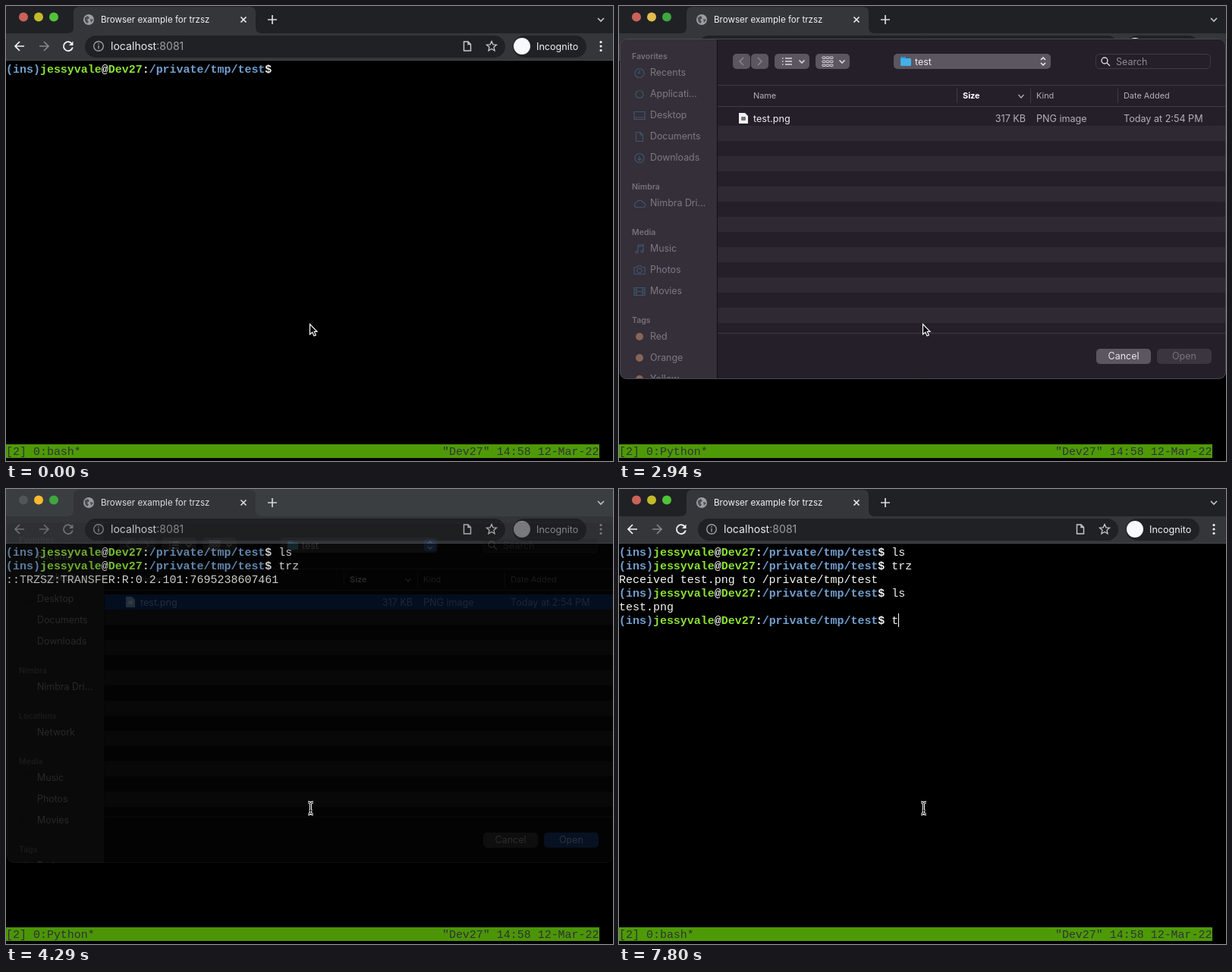
An HTML page with a canvas that plays this animation: 800 px wide and 600 px high, repeating every 8 s.

```html
<!DOCTYPE html>
<html lang="en">
<head>
<meta charset="utf-8">
<title>Browser terminal upload</title>
<style>
  html, body { margin: 0; width: 100%; height: 100%; overflow: hidden; background: #000; }
  canvas { display: block; }
</style>
</head>
<body>
<canvas id="stage" width="800" height="600"></canvas>
<script>
const ctx = document.getElementById('stage').getContext('2d');
const LOOP = 8000, CELL = 8.983, ROW = 18, TOP = 74, COLS = 87;
const BLUE = '#729fcf', GREEN = '#8ae234', WHITE = '#f4f4f2';
const PROMPT = [['(ins)', BLUE], ['jessyvale', GREEN], ['@', WHITE], ['Dev27', GREEN],
  [':', WHITE], ['/private/tmp/test', BLUE], ['$', WHITE]];
const PROMPT_COLS = 40;

// Sheet steps: time, top edge, opacity, page dimming
const SHEET = [[2940, 43, 1, 0], [3060, 59, 1, .2], [3180, 69, 1, .32], [3300, 73, 1, .4],
  [4110, 73, 1, .4], [4290, 44, .14, .03], [4440, 43, 0, 0]];

const OPENING = { bg: '#241f29', stripe: '#2e2933', side: '#342f39', item: '#7e7983', head: '#77727c',
  icon: '#3c566d', line: '#403b45', button: '#5b5660', faint: '#3a353f', popup: '#5b5660' };
const SETTLED = { bg: '#1b1b1b', stripe: '#232525', side: '#323232', item: '#e0e0e0', head: '#7f7f7f',
  icon: '#2f8be6', line: '#3a3a3a', button: '#525252', faint: '#373737', popup: '#4c4c4c' };

const ICONS = {
  clock: 'M-6 0a6 6 0 1 0 12 0a6 6 0 1 0-12 0M0-4V0H-3',
  disc: 'M-5 0a5 5 0 1 0 10 0a5 5 0 1 0-10 0',
  desktop: 'M-7-5H7V5H-7ZM-7 2.5H7',
  page: 'M-4.5-6H1L4.5-2.5V6H-4.5ZM1-6V-2.5H4.5',
  down: 'M-6 0a6 6 0 1 0 12 0a6 6 0 1 0-12 0M0-3V3M-2.5 .5L0 3L2.5 .5',
  cloud: 'M-4 5H4.5A3 3 0 0 0 5-1A5 5 0 0 0-4-1.5A3.3 3.3 0 0 0-4 5Z',
  globe: 'M-6 0a6 6 0 1 0 12 0a6 6 0 1 0-12 0M-6 0H6M0-6V6M0-6Q-6 0 0 6M0-6Q6 0 0 6',
  note: 'M-2 4V-5L5-6V3M-2-3L5-4M-5 4a1.5 1.5 0 1 0 3 0a1.5 1.5 0 1 0-3 0M2 3a1.5 1.5 0 1 0 3 0a1.5 1.5 0 1 0-3 0',
  camera: 'M-7-4H-3L-2-6H2L3-4H7V5H-7ZM-3 .5a3 3 0 1 0 6 0a3 3 0 1 0-6 0',
  film: 'M-7-5H7V5H-7ZM-4-5V5M4-5V5M-4 0H4M-7-2H-4M-7 2H-4M4-2H7M4 2H7'
};

const SECTIONS = [
  ['Favorites', ['Recents', 'clock'], ['Applicati…', 'disc'], ['Desktop', 'desktop'],
    ['Documents', 'page'], ['Downloads', 'down']],
  ['Nimbra', ['Nimbra Dri…', 'cloud']],
  ['Locations', ['Network', 'globe']],
  ['Media', ['Music', 'note'], ['Photos', 'camera'], ['Movies', 'film']],
  ['Tags', ['Red'], ['Orange'], ['Yellow']]
];

function box(x, y, w, h, r, fill, stroke) {
  ctx.beginPath();
  ctx.roundRect(x, y, w, h, r);
  if (fill) { ctx.fillStyle = fill; ctx.fill(); }
  if (stroke) { ctx.strokeStyle = stroke; ctx.lineWidth = 1; ctx.stroke(); }
}

const dot = (x, y, r, fill) => box(x - r, y - r, 2 * r, 2 * r, r, fill);

// Text centred vertically on its capitals
function label(s, x, y, size, color, weight = 400, align = 'left') {
  ctx.font = `${weight} ${size}px Inter, sans-serif`;
  ctx.textAlign = align;
  ctx.fillStyle = color;
  ctx.fillText(s, x, y + size * .36);
}

function line(d, x, y, color, width = 1.2, fill) {
  const path = new Path2D(d);
  ctx.save();
  ctx.translate(x, y);
  ctx.lineWidth = width;
  ctx.strokeStyle = color;
  if (fill) { ctx.fillStyle = fill; ctx.fill(path); }
  ctx.stroke(path);
  ctx.restore();
}

function mono(s, col, row, color, weight = 400) {
  ctx.font = `${weight} 14.97px "Liberation Mono", monospace`;
  ctx.textAlign = 'left';
  ctx.fillStyle = color;
  ctx.fillText(s, col * CELL, TOP + row * ROW + 14);
}

const isIdle = t => t >= 3300 && t < 4600;

function chrome(t) {
  const idle = isIdle(t);
  const icon = idle ? '#8b8d91' : '#f1f3f4';
  const title = idle ? '#e4e6e8' : '#f1f3f4';
  box(0, 0, 800, 36, 0, idle ? '#3c4043' : '#202124');
  line('M81 36Q89 36 89 28V9Q89 1 97 1H321Q329 1 329 9V28Q329 36 337 36Z', 0, 0, 'transparent', 0, '#35363a');
  dot(109, 18, 7, '#9aa0a6');
  line('M-5-3L-1-5L1-2L-2 0L0 3L-2 5Q-6 2-5-3ZM2-1L6 0L3 4Z', 109, 18, 'transparent', 0, '#4b4d51');
  label('Browser example for trzsz', 125, 18, 11.6, title);
  line('M-3.5-3.5L3.5 3.5M3.5-3.5L-3.5 3.5', 313, 18, title, 1.6);
  line('M-6 0H6M0-6V6', 351, 18, '#dadce0', 1.7);
  line('M-4-2L0 2L4-2', 784, 18, '#c4c7ca', 1.6);

  box(0, 36, 800, 36, 0, '#35363a');
  box(0, 71, 800, 1, 0, '#4a4b4f');
  line('M6 0H-6M0-6L-6 0L0 6', 18, 53, icon, 1.7);
  line('M-6 0H6M0-6L6 0L0 6', 50, 53, '#85878b', 1.7);
  line('M5-3A6 6 0 1 0 5.8 1.5', 82, 53, icon, 1.8);
  line('M6.5-6.5V-1H1Z', 82, 53, 'transparent', 0, icon);
  box(104, 39, 554, 29, 14.5, '#202124');
  line('M-6.3 0a6.3 6.3 0 1 0 12.6 0a6.3 6.3 0 1 0-12.6 0M0-1V3.5M0-3.7V-2.2', 122, 53, '#9aa0a6', 1.4);
  label('localhost', 138, 53, 14.1, '#e8eaed');
  const hostWidth = ctx.measureText('localhost').width;
  label(':8081', 138 + hostWidth, 53, 14.1, '#9aa0a6');
  line(ICONS.page, 608, 53, '#c8cbce', 1.4);
  line('M0-6.5L1.9-2.2L6.5-1.8L3 1.3L4 6L0 3.5L-4 6L-3 1.3L-6.5-1.8L-1.9-2.2Z', 640, 53, '#c8cbce', 1.3);
  box(668, 39, 97, 29, 14.5, '#202124');
  dot(680, 53, 11, idle ? '#8b8d91' : '#f8f9fa');
  label('Incognito', 699, 53, 12.6, idle ? '#9aa0a6' : '#f1f3f4');
  for (const y of [47.5, 53, 58.5]) dot(784, y, 1.6, icon);
}

function windowButtons(t) {
  const idle = isIdle(t), hover = t >= 2940 && t < 4600;
  dot(23, 14.5, 6, idle ? 'rgba(255,255,255,.12)' : '#cb625a');
  dot(43, 14.5, 6, idle ? '#fbb92e' : hover ? '#e2bd4f' : '#c1bb2b');
  dot(63, 14.5, 6, t >= 2940 && t < 6550 ? '#3da83f' : '#50c338');
}

function progress(t, ink) {
  const step = Math.min(5, Math.floor((t - 4990) / 230));
  const done = t < 4950 ? .17 : t < 5220 ? .34 : .34 + .66 * step / 5;
  const size = Math.round(310 * done);
  const shown = t < 4950 ? 4780 : t < 5220 ? 4950 : 4990 + 230 * step;
  const speed = Math.round(310 * done / (shown - 4455) * 1000);
  const eta = Math.round((310 - size) / speed);
  const tail = `] ${Math.round(done * 100)}% | ${size}KB | ${speed}KB/s | 00:0${eta} ETA`;
  const room = COLS - 10 - tail.length, full = Math.round(room * done);
  mono('test.png [', 0, 3, ink);
  box(10 * CELL - .8, 128, room * CELL, ROW, 0, 'rgba(6,152,154,.25)');
  box(10 * CELL - .8, 128, full * CELL, ROW, 0, '#06989a');
  mono(tail, 10 + room, 3, ink);
}

function terminal(t, tint) {
  const ink = tint || WHITE;
  const prompt = (row, cmd, keys, left) => {
    let col = 0;
    for (const [s, color] of PROMPT) {
      mono(s, col, row, tint || color, 700);
      col += s.length;
    }
    const typed = cmd.slice(0, keys.filter(k => t >= k).length);
    mono(typed, PROMPT_COLS, row, ink);
    const caretOn = t >= 350 && t < left;
    if (caretOn) box(Math.round((PROMPT_COLS + typed.length) * CELL), TOP + row * ROW, 1, ROW, 0, '#fff');
  };
  prompt(0, 'ls', [350, 650], 950);
  if (t >= 1010) prompt(1, 'trz', [1540, 1740, 1950], 2250);
  if (t >= 6550) {
    mono('Received test.png to /private/tmp/test', 0, 2, ink);
    prompt(3, 'ls', [7090, 7200], 7320);
  } else if (t >= 2460) {
    mono('::TRZSZ:TRANSFER:R:0.2.101:7695238607461', 0, 2, ink);
    if (t >= 4780) progress(t, ink);
  }
  if (t >= 7320) mono('test.png', 0, 4, ink);
  if (t >= 7440) prompt(5, 't', [7800], LOOP);
}

function statusBar(t) {
  box(0, 578, 782, ROW, 0, '#4e9a06');
  const program = t >= 2460 && t < 7320 ? 'Python' : 'bash';
  mono(`[2] 0:${program}*`, 0, 28, '#2e3436');
  mono('"Dev27" 14:58 12-Mar-22', 64, 28, '#2e3436');
}

function sidebar(c, fresh, closing) {
  box(1, 43, 128, 449, 0, c.side);
  box(129, 43, 1, 449, 0, '#111');
  let y = 66;
  for (const [head, ...items] of SECTIONS) {
    if (fresh && head === 'Locations') continue;
    label(head, 17, y, 10.5, c.head, 600);
    y += 22;
    for (const [name, icon] of items) {
      if (icon) line(ICONS[icon], 27, y + .5, closing ? '#0c0c0c' : c.icon);
      else dot(27, y, 5, fresh ? '#866557' : '#d0814f');
      label(name, 41, y, 12.4, c.item);
      y += 28;
    }
    y += 10;
  }
}

function dialog(t, top) {
  const fresh = t < 3060, closing = t >= 4020, picked = t >= 3630;
  const c = fresh ? OPENING : SETTLED;
  const text = '#d9d7da', muted = '#b4b1b6', gray = '#8e8b91';
  ctx.save();
  ctx.translate(0, top - 43);
  ctx.beginPath();
  ctx.roundRect(1, 43, 799, 449, 9);
  ctx.clip();
  box(1, 43, 799, 449, 0, c.bg);
  sidebar(c, fresh, closing);

  box(150, 63, 23, 20, 5, c.button);
  box(174, 63, 23, 20, 5, c.button);
  line('M2-5L-3 0L2 5', 162, 73, gray, 1.3);
  line('M-2-5L3 0L-2 5', 185, 73, gray, 1.3);
  box(205, 63, 46, 20, 5, c.button);
  box(259, 63, 45, 20, 5, c.button);
  line('M-6-4H-4.5M-6 0H-4.5M-6 4H-4.5M-2-4H7M-2 0H7M-2 4H7', 221, 73, text, 1.4);
  for (let i = 0; i < 9; i++)
    box(268 + i % 3 * 5, 67 + Math.floor(i / 3) * 5, 4, 2.5, .5, null, text);
  line('M-3.5-1.5L0 2L3.5-1.5', 241, 73, text, 1.6);
  line('M-3.5-1.5L0 2L3.5-1.5', 294, 73, text, 1.6);

  box(362, 63, 207, 20, 5, c.popup);
  box(371, 67, 7, 4, 1, '#2a93d0');
  box(371, 69, 14, 10, 1.5, '#43b0e8');
  label('test', 390, 73, 12.5, '#eeecef');
  if (!fresh) box(551, 65, 16, 16, 4, '#1760cf');
  line('M-3-2L0-5L3-2M-3 2L0 5L3 2', 559, 73, '#f0f0f0', 1.5);
  box(628.5, 63.5, 151, 19, 5, c.bg, c.line);
  line('M-5-1a4 4 0 1 0 8 0a4 4 0 1 0-8 0M2 2L6 6', 641, 73, text, 1.4);
  label('Search', 655, 73.5, 12.5, gray);

  box(130, 104, 670, 1, 0, c.line);
  box(130, 132, 670, 1, 0, c.line);
  for (const x of [445, 542, 657]) box(x, 109, 1, 19, 0, c.line);
  label('Name', 177, 118, 10.9, muted);
  label('Size', 453, 118, 10.9, '#fff', 700);
  line('M-3.5-2L0 2L3.5-2', 530, 119, muted, 1.2);
  label('Kind', 550, 118, 10.9, muted);
  label('Date Added', 665, 118, 10.9, muted);

  for (let y = 158; y < 418; y += 40) box(130, y, 670, 20, 0, c.stripe);
  if (picked) box(130, 138, 670, 20, 0, '#0050bd');
  const detail = picked ? '#aac4ec' : muted;
  line('M158 141H166L170 145V155H158Z', 0, 0, 'transparent', 0, '#f2f2f2');
  box(161, 146, 6, 5, 1, '#77777c');
  label('test.png', 177, 148.5, 12.6, '#f0eef1');
  label('317 KB', 536, 148.5, 12.6, detail, 400, 'right');
  label('PNG image', 550, 148.5, 12.6, detail);
  label('Today at 2:54 PM', 665, 148.5, 12.6, detail);

  box(130, 431, 670, 1, 0, c.line);
  box(629, 452, 72, 20, 5, c.button);
  label('Cancel', 665, 461.5, 12.5, '#e8e6ea', 400, 'center');
  box(709, 452, 72, 20, 5, picked ? '#1f63d2' : c.faint);
  label('Open', 745, 461.5, 12.5, picked ? '#fff' : '#77737b', 400, 'center');
  box(1.5, 43.5, 798, 448, 9, null, fresh ? '#4d4852' : '#484848');
  ctx.restore();
}

function pointer(t) {
  if (t < 4020) {
    line('M.5 .5V14L3.7 11.2L6 16L8.4 15L6.2 10.4H10Z', 400, 419, '#fff', 1.2, '#000');
    return;
  }
  const beam = 'M-3.5-8Q0-8 0-5.5V5.5Q0 8-3.5 8M3.5-8Q0-8 0-5.5M0 5.5Q0 8 3.5 8M-2 3H2';
  line(beam, 401.5, 421, '#fff', 3);
  line(beam, 401.5, 421, '#000', 1);
}

function sheet(t) {
  const step = SHEET.findLast(s => t >= s[0]);
  if (!step || !step[2]) return;
  const [, top, alpha, dim] = step;
  box(0, 0, 800, 600, 0, `rgba(10,10,14,${dim})`);
  ctx.save();
  ctx.globalAlpha = alpha;
  dialog(t, top);
  if (t >= 4110 && t < 4290) {
    // The page starts to shine through the closing sheet
    ctx.globalCompositeOperation = 'lighten';
    terminal(t, '#363636');
  }
  ctx.restore();
}

function draw(t) {
  box(0, 0, 800, 600, 0, '#000');
  chrome(t);
  terminal(t);
  statusBar(t);
  sheet(t);
  windowButtons(t);
  pointer(t);
}

const start = performance.now();
function tick(now) {
  draw(Math.max(0, now - start) % LOOP);
  requestAnimationFrame(tick);
}
draw(0);
requestAnimationFrame(tick);
</script>
</body>
</html>
```
